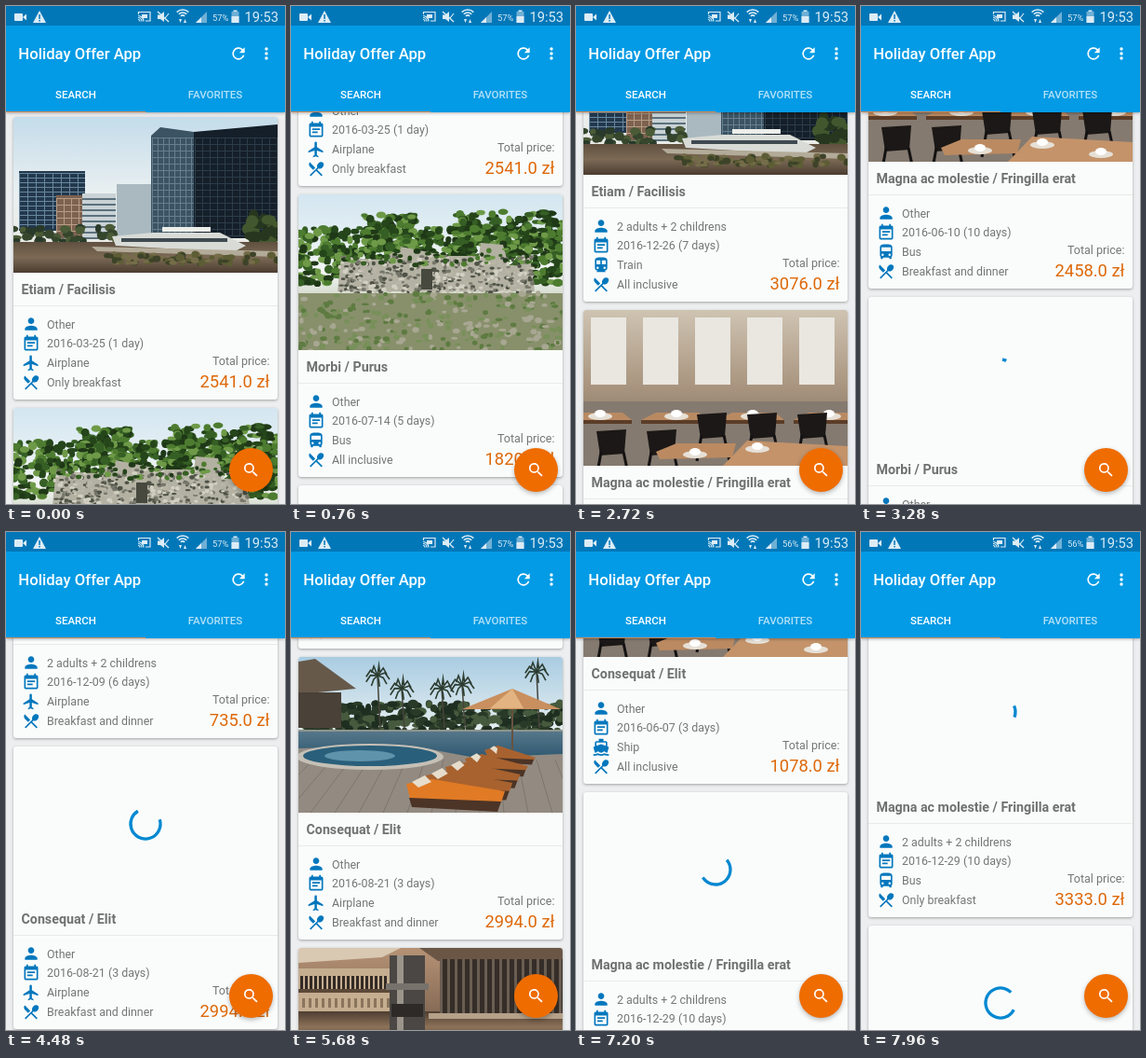
An HTML page with a canvas that plays this animation: 300 by 534 pixels, repeating every 8000 ms.

```html
<!DOCTYPE html>
<html lang="en">
<head>
<meta charset="utf-8">
<title>Holiday Offer App</title>
<style>
html, body { margin: 0; width: 100%; height: 100%; overflow: hidden; background: #eceeef; }
canvas { display: block; width: 300px; height: 534px; }
</style>
</head>
<body>
<canvas id="stage" width="300" height="534"></canvas>
<script>
const LOOP = 8000, PITCH = 312, TOP = 119, CARD_H = 303, IMG_W = 284, IMG_H = 167;
const BLUE = '#0277bd', ORANGE = '#ef6c00';
const stage = document.getElementById('stage').getContext('2d');
let c = stage;

// Icons on a 24 unit grid
const icons = {
  person: 'M12 12c2.21 0 4-1.79 4-4s-1.79-4-4-4-4 1.79-4 4 1.79 4 4 4zm0 2c-2.67 0-8 1.34-8 4v2h16v-2c0-2.66-5.33-4-8-4z',
  date: 'M19 3h-1V1h-2v2H8V1H6v2H5Q3 3 3 5V19Q3 21 5 21H19Q21 21 21 19V5Q21 3 19 3zM19 19H5V8H19zM17 10H7v2h10zM14 14H7v2h7z',
  Airplane: 'M21 16v-2l-8-5V3.5a1.5 1.5 0 0 0-3 0V9l-8 5v2l8-2.5V19l-2 1.5V22l3.5-1 3.5 1v-1.5L13 19v-5.5z',
  food: 'M8.1 13.34l2.83-2.83L3.91 3.5c-1.56 1.56-1.56 4.09 0 5.66zM14.88 11.53c1.53.71 3.68.21 5.27-1.38 1.91-1.91 2.28-4.65.81-6.12-1.46-1.46-4.2-1.1-6.12.81-1.59 1.59-2.09 3.74-1.38 5.27L3.7 19.87l1.41 1.41L12 14.41l6.88 6.88 1.41-1.41L13.41 13z',
  Bus: 'M4 16q0 1.4 1 2.2V20q0 1 1 1h1q1 0 1-1v-1h8v1q0 1 1 1h1q1 0 1-1v-1.8q1-.8 1-2.2V6c0-3.5-3.6-4-8-4s-8 .5-8 4zM6 15.5a1.5 1.5 0 1 1 3 0a1.5 1.5 0 1 1-3 0zM15 15.5a1.5 1.5 0 1 1 3 0a1.5 1.5 0 1 1-3 0zM18 11H6V6h12z',
  Train: 'M12 2c-4.4 0-8 .5-8 4v9.5Q4 19 7.5 19L6 20.5v.5h12v-.5L16.5 19Q20 19 20 15.5V6c0-3.5-3.6-4-8-4zM6 15.5a1.5 1.5 0 1 1 3 0a1.5 1.5 0 1 1-3 0zM15 15.5a1.5 1.5 0 1 1 3 0a1.5 1.5 0 1 1-3 0zM11 11H6V6h5zM18 11h-5V6h5z',
  Ship: 'M2 21q3 0 6-1.3 4 2.6 8 0 3 1.3 6 1.3v2q-3 0-6-1-4 2-8 0-3 1-6 1zM4 19q2.4 0 4-2 4 4 8 0 1.6 2 4 2l2-7.2-2-1.2V6q0-2-2-2h-3V1H9v3H6q-2 0-2 2v4.6l-2 1.2zM6 6h12v4l-6-2-6 2z',
  Other: 'M2 21L23 12 2 3v7l15 2-15 2z',
  search: 'M15.5 14h-.8l-.3-.3A6.5 6.5 0 1 0 13.7 14.4l.3.3v.8l5 5L20.5 19zM9.5 14a4.5 4.5 0 1 1 0-9a4.5 4.5 0 0 1 0 9z',
  refresh: 'M17.65 6.35A8 8 0 1 0 19.73 14h-2.08A6 6 0 1 1 16.22 7.78L13 11h7V4z'
};
for (const k in icons) icons[k] = new Path2D(icons[k]);

const rect = (color, x, y, w, h) => { c.fillStyle = color; c.fillRect(x, y, w, h); };
function poly(color, ...p) {
  c.fillStyle = color;
  c.beginPath();
  for (let i = 0; i < p.length; i += 2) c.lineTo(p[i], p[i + 1]);
  c.fill();
}
function oval(color, x, y, rx, ry = rx) {
  c.fillStyle = color;
  c.beginPath();
  c.ellipse(x, y, rx, ry, 0, 0, 7);
  c.fill();
}
function line(color, width, ...p) {
  c.strokeStyle = color;
  c.lineWidth = width;
  c.beginPath();
  for (let i = 0; i < p.length; i += 2) c.lineTo(p[i], p[i + 1]);
  c.stroke();
}
function fade(y, h, ...colors) {
  const g = c.createLinearGradient(0, y, 0, y + h);
  colors.forEach((col, i) => g.addColorStop(i / (colors.length - 1), col));
  rect(g, 0, y, IMG_W, h);
}
function text(str, x, y, size, color, weight = 400, align = 'left') {
  c.font = `${weight} ${size}px Roboto, sans-serif`;
  c.textAlign = align;
  c.fillStyle = color;
  c.fillText(str, x, y);
}
function icon(name, x, y, color) {
  c.save();
  c.translate(x - 10, y - 10);
  c.scale(20 / 24, 20 / 24);
  c.fillStyle = color;
  c.fill(icons[name], 'evenodd');
  c.restore();
}
function shadow(color, blur, dy, draw) {
  c.save();
  c.shadowColor = color;
  c.shadowBlur = blur;
  c.shadowOffsetY = dy;
  draw();
  c.restore();
}

let seed = 1;
const rnd = (a, b) => a + (b - a) * ((seed = seed * 16807 % 2147483647) / 2147483647);
function specks(n, colors, x0, y0, x1, y1, r) {
  for (let i = 0; i < n; i++)
    oval(colors[i % colors.length], rnd(x0, x1), rnd(y0, y1), rnd(r / 2, r), rnd(r / 3, r * .8));
}
function windows(color, x, y, w, h, dx, dy) {
  for (let i = x; i < x + w; i += dx) rect(color, i, y, 1, h);
  for (let j = y; j < y + h; j += dy) rect(color, x, j, w, 1);
}
function chair(x, y) {
  poly('#1b1817', x, y, x + 32, y - 2, x + 30, y + 24, x + 4, y + 26);
  line('#141212', 3, x + 5, y + 22, x, y + 50);
  line('#141212', 3, x + 29, y + 22, x + 35, y + 50);
}
function cup(x, y) {
  oval('#e6e0d7', x, y + 3, 13, 4);
  oval('#fff', x, y, 6, 4);
}

// Simplified holiday pictures
const scenes = {
  city() {
    fade(0, IMG_H, '#c4dcea', '#eaf0f1', '#e8e6de');
    rect('#aab9c0', 111, 72, 42, 58);
    rect('#23384c', 6, 58, 71, 64);
    windows('#6888a0', 6, 60, 71, 60, 9, 5);
    rect('#7d6250', 46, 84, 32, 46);
    windows('#b79d85', 46, 87, 32, 42, 8, 7);
    rect('#c9d2d5', 74, 82, 36, 49);
    for (let y = 87; y < 130; y += 6) rect('#5b717d', 74, y, 36, 2);
    poly('#3b5363', 148, 20, 158, 11, 194, 16, 194, 128, 148, 128);
    windows('#66808f', 149, 22, 45, 104, 6, 7);
    poly('#151f29', 194, 16, 284, 8, 284, 130, 194, 130);
    windows('#2c3c49', 195, 22, 89, 106, 8, 7);
    specks(50, ['#35462d', '#4b5b37', '#293a2a'], 0, 118, 110, 134, 6);
    specks(30, ['#27371f', '#43572f'], 252, 106, 284, 142, 9);
    fade(134, 33, '#60503f', '#7c6a56', '#4a3c30');
    poly('#d8dbd6', 106, 128, 150, 124, 222, 124, 250, 138, 236, 145, 110, 138);
    rect('#3f4a50', 116, 130, 114, 4);
    rect('#eceeea', 160, 118, 52, 5);
    poly('#b3ab99', 84, 139, 284, 144, 284, 150, 90, 144);
    specks(90, ['#5d5d35', '#756c49', '#3d4328'], 100, 147, 284, 157, 5);
  },
  ruins() {
    fade(0, IMG_H, '#d3e6f1', '#f3f6f5', '#8d9b70');
    const leaves = ['#25451a', '#4d7c30', '#1f3817', '#6e9a48', '#365f25'];
    specks(700, leaves, 0, 36, 284, 96, 6);
    specks(120, leaves, 70, 22, 125, 60, 6);
    specks(160, leaves, 170, 18, 284, 60, 6);
    poly('#b3b1a2', 42, 104, 46, 68, 90, 70, 110, 56, 160, 66, 194, 66, 196, 52, 220, 54, 226, 76, 250, 74, 254, 104);
    specks(480, ['#d2d0c2', '#77776b', '#b9b6a8', '#4e5246'], 44, 66, 252, 106, 3);
    specks(60, leaves, 40, 56, 250, 76, 4);
    rect('#47493f', 132, 80, 12, 22);
    rect('#88906b', 0, 106, 284, 61);
    specks(300, ['#a8a792', '#78905a', '#5e7b42'], 0, 106, 284, 167, 4);
  },
  restaurant() {
    fade(0, IMG_H, '#cfc3b2', '#a8947e', '#6d6057');
    for (let x = 8; x < 284; x += 56) rect('#e9e7e0', x, 8, 38, 72);
    rect('#857a70', 0, 98, 284, 69);
    for (let i = 0; i < 4; i++) {
      const x = i * 82 - 20;
      poly('#b98a62', x, 118, x + 16, 110, x + 62, 110, x + 72, 118);
      rect('#5b3d28', x, 118, 72, 4);
      cup(x + 38, 111);
    }
    for (let x = 14; x < 284; x += 54) chair(x, x > 120 ? 112 : 130);
    poly('#bb8a61', 78, 152, 100, 143, 164, 143, 160, 158, 82, 160);
    poly('#c4936a', 150, 167, 176, 140, 284, 146, 284, 167);
    cup(120, 152);
    cup(187, 146);
    cup(250, 156);
  },
  pool() {
    fade(0, 90, '#a9cce2', '#eef3f2');
    specks(420, ['#2a3a28', '#465a3d', '#1e2e20'], 0, 50, 284, 80, 6);
    for (const [x, y, h] of [[85, 20, 60], [111, 34, 45], [154, 34, 42], [176, 30, 46], [256, 16, 60]]) {
      line('#45443a', 1.5, x, y, x + 3, y + h);
      for (let a = 0; a < 9; a++) {
        const dx = Math.cos(a * .7), dy = 8 * Math.sin(a * .7);
        line('#2d3c30', 1.6, x, y, x + 8 * dx, y - 3 + dy, x + 13 * dx, y + 4 + dy);
      }
    }
    poly('#67594a', 0, 5, 18, 2, 62, 34, 0, 40);
    rect('#4a4138', 0, 38, 46, 38);
    fade(80, 30, '#56778a', '#2c566f');
    rect('#8e958f', 0, 78, 284, 2);
    poly('#938b82', 0, 98, 120, 95, 190, 108, 284, 104, 284, 167, 0, 167);
    for (let i = 0; i < 15; i++) line('#7d766e', 1, i * 20 - 4, 110, i * 26 - 65, 167);
    oval('#c5c0b6', 77, 107, 79, 14);
    oval('#2a5f7b', 77, 106, 72, 11);
    oval('#5e93ab', 66, 106, 38, 6);
    line('#665340', 2, 230, 36, 230, 112);
    poly('#c98f5e', 176, 56, 230, 34, 282, 56);
    poly('#e3b382', 206, 55, 230, 34, 242, 55);
    for (let i = 4; i >= 0; i--) {
      const x = 116 + i * 21, y = 136 - i * 9, k = 1 - i * .12;
      poly(i ? '#a8622f' : '#e07a25', x, y, x + 28 * k, y - 5, x + 106 * k, y + 8, x + 102 * k, y + 20 * k, x + 4, y + 16 * k);
      poly('#4c3426', x + 3, y + 15 * k, x + 102 * k, y + 19 * k, x + 98 * k, y + 30 * k, x + 6, y + 25 * k);
      poly('#e6ddcc', x + 6, y - 2, x + 20 * k, y - 9 * k, x + 27 * k, y - 2, x + 13, y + 4);
    }
  },
  bar() {
    fade(0, IMG_H, '#b59275', '#7d6350', '#34271f');
    poly('#d9c8b2', 0, 0, 110, 0, 90, 10, 0, 16);
    poly('#6b5646', 130, 0, 284, 0, 284, 12, 150, 14);
    rect('#c5ad90', 0, 22, 98, 46);
    for (let x = 2; x < 96; x += 5) rect('#332a24', x, 30, 3, 14);
    rect('#5c4938', 0, 44, 98, 4);
    for (let x = 4; x < 96; x += 7) rect('#8a745c', x, 54, 3, 10);
    fade(68, 34, '#4e3e32', '#8d7259', '#4c392a');
    rect('#4a4744', 98, 8, 38, 100);
    rect('#9b948a', 106, 8, 7, 100);
    rect('#77726c', 94, 38, 46, 7);
    rect('#2d2a28', 100, 60, 34, 14);
    for (let x = 152; x < 284; x += 8) {
      rect('#6a5e52', x, 12, 3, 58);
      rect('#352d28', x + 3, 12, 5, 58);
    }
    rect('#b5a189', 140, 70, 144, 6);
    rect('#2b221c', 0, 102, 284, 65);
    for (let x = 18; x < 284; x += 52) { oval('#92755a', x, 122, 22, 6); rect('#604936', x - 3, 128, 6, 39); }
  }
};
for (const k in scenes) {
  const cv = document.createElement('canvas');
  cv.width = IMG_W;
  cv.height = IMG_H;
  c = cv.getContext('2d');
  scenes[k]();
  scenes[k] = cv;
}
c = stage;

// title, people, date, transport, food, price, scene, spinner start, picture loaded
const cards = [
  ['Etiam / Facilisis', 'Other', '2016-03-25 (1 day)', 'Airplane', 'Only breakfast', '2541.0', 'city', -1, -999],
  ['Morbi / Purus', 'Other', '2016-07-14 (5 days)', 'Bus', 'All inclusive', '1820.0', 'ruins', -1, -999],
  ['Etiam / Facilisis', '2 adults + 2 childrens', '2016-12-26 (7 days)', 'Train', 'All inclusive', '3076.0', 'city', 760, 2500],
  ['Magna ac molestie / Fringilla erat', 'Other', '2016-06-10 (10 days)', 'Bus', 'Breakfast and dinner', '2458.0', 'restaurant', 893, 2350],
  ['Morbi / Purus', 'Other', '2016-09-17 (4 days)', 'Train', 'Only breakfast', '1246.0', 'ruins', 3240, 3800],
  ['Etiam / Facilisis', '2 adults + 2 childrens', '2016-12-09 (6 days)', 'Airplane', 'Breakfast and dinner', '735.0', 'city', 3400, 4300],
  ['Consequat / Elit', 'Other', '2016-08-21 (3 days)', 'Airplane', 'Breakfast and dinner', '2994.0', 'pool', 4067, 4850],
  ['Morbi / Purus', '2 adults + children', '2016-12-28 (6 days)', 'Other', 'Breakfast and dinner', '1635.0', 'bar', 4930, 5400],
  ['Consequat / Elit', 'Other', '2016-06-07 (3 days)', 'Ship', 'All inclusive', '1078.0', 'restaurant', 6370, 6760],
  ['Magna ac molestie / Fringilla erat', '2 adults + 2 childrens', '2016-12-29 (10 days)', 'Bus', 'Only breakfast', '3333.0', 'pool', 6920, 9000],
  ['Etiam / Facilisis', 'Other', '2016-10-02 (2 days)', 'Train', 'All inclusive', '1490.0', 'bar', 7296, 9000]
];

// Each fling: start, duration, distance
const flings = [[690, 600, 729], [3200, 250, 472], [3985, 450, 560], [4900, 400, 96], [6329, 235, 531], [6915, 1070, 429]];
const clamp = v => Math.min(1, Math.max(0, v));
const scrollAt = t => flings.reduce((s, [at, dur, dist]) => s + dist * (1 - (1 - clamp((t - at) / dur)) ** 3), 0);

// Cubic bezier (.4, 0, .2, 1)
function ease(x) {
  let lo = 0, hi = 1, u;
  for (let i = 0; i < 16; i++) {
    u = (lo + hi) / 2;
    if (1.2 * u * (1 - u) ** 2 + .6 * u * u * (1 - u) + u ** 3 < x) lo = u; else hi = u;
  }
  return u * u * (3 - 2 * u);
}

function spinner(x, y, age) {
  const turns = Math.max(0, age) / 1333, n = Math.floor(turns), p = turns - n;
  const base = -90 + 234 * turns + 288 * n;
  const from = base + 288 * ease(clamp(p * 2 - 1)), to = base + 288 * ease(clamp(p * 2));
  c.strokeStyle = '#0288d1';
  c.lineWidth = 3.3;
  c.beginPath();
  c.arc(x, y, 16, from * Math.PI / 180, Math.max(to, from + 16) * Math.PI / 180);
  c.stroke();
}

function drawCard([title, people, date, transport, food, price, scene, born, loaded], y, t) {
  c.beginPath();
  c.roundRect(8, y, IMG_W, CARD_H, 3);
  c.fillStyle = '#fafcfc';
  shadow('rgba(0,0,0,.32)', 3, 1, () => c.fill());
  if (t < loaded) spinner(150, y + 83, t - born);
  else {
    c.save();
    c.clip();
    c.globalAlpha = clamp((t - loaded) / 200);
    c.drawImage(scenes[scene], 8, y);
    c.restore();
  }
  text(title, 16.5, y + 190, 14.25, '#707070', 700);
  rect('#e9ebeb', 8, y + 202, IMG_W, 1);
  [['person', people], ['date', date], [transport, transport], ['food', food]].forEach(([name, label], i) => {
    const cy = y + 222 + i * 20.9;
    icon(name, 27, cy, BLUE);
    text(label, 44, cy + 4.5, 12.45, '#757575');
  });
  text('Total price:', 283.5, y + 266, 12.5, '#757575', 400, 'right');
  text(price + ' zł', 283.5, y + 290, 18.33, '#de6809', 400, 'right');
}

function statusBar(t) {
  const w = '#dcecf5', dim = '#6fb0d5';
  rect('#0277b8', 0, 0, 300, 21);
  c.fillStyle = w;
  c.beginPath();
  c.roundRect(9, 8, 9, 8, 1);
  c.fill();
  poly(w, 18, 12, 22, 8.5, 22, 15.5);
  poly(w, 36, 5, 43, 18, 29, 18);
  rect(BLUE, 35.3, 9, 1.5, 5);
  rect(BLUE, 35.3, 15, 1.5, 1.5);
  line(w, 1.2, 142.5, 9, 142.5, 6.5, 155, 6.5, 155, 16, 150, 16);
  rect(w, 146, 9, 6, 4);
  c.lineWidth = 1.2;
  for (const r of [2, 4, 6]) { c.beginPath(); c.arc(142, 16.5, r, -Math.PI / 2, 0); c.stroke(); }
  poly(w, 163, 9.5, 166, 9.5, 170, 6, 170, 17, 166, 14, 163, 14);
  line(w, 1.4, 163, 6, 175, 17);
  line(w, 1.2, 171, 13, 175, 8);
  c.lineWidth = 1.6;
  for (const r of [3, 6, 9]) { c.beginPath(); c.arc(190, 13, r, -2.35, -.79); c.stroke(); }
  poly(w, 186, 14, 189, 14, 187.5, 18);
  poly(w, 191, 18, 194, 18, 192.5, 14);
  poly(dim, 204, 18, 216, 18, 216, 6);
  poly(w, 204, 18, 210, 18, 210, 12);
  text(t < 7000 ? '57%' : '56%', 222, 15.5, 9.3, w);
  rect(dim, 242.5, 6, 8, 12);
  rect(w, 242.5, 11, 8, 7);
  rect(w, 244.5, 4.5, 4, 1.5);
  text('19:53', 256.5, 17, 14.7, w);
}

function draw() {
  const t = performance.now() % LOOP, scroll = scrollAt(t);
  rect('#eceeef', 0, 0, 300, 534);
  cards.forEach((card, i) => {
    const y = Math.round(TOP + i * PITCH - scroll);
    if (y > -CARD_H && y < 540) drawCard(card, y, t);
  });

  shadow('rgba(0,0,0,.3)', 3, 1, () => rect('#039be5', 0, 0, 300, 114));
  statusBar(t);
  text('Holiday Offer App', 13.33, 57, 16.67, '#fff', 500);
  icon('refresh', 250, 51, '#fff');
  for (const y of [46, 51, 56]) oval('#fff', 280, y, 1.7);
  text('SEARCH', 75, 99, 11.5, '#fff', 500, 'center');
  text('FAVORITES', 225, 99, 11.5, 'rgba(255,255,255,.7)', 500, 'center');
  rect('#d08a55', 0, 113, 150, 1);

  shadow('rgba(0,0,0,.28)', 5, 2, () => oval(ORANGE, 263.5, 497.5, 23.5));
  icon('search', 263.5, 497.5, '#fff');
  requestAnimationFrame(draw);
}
draw();
</script>
</body>
</html>
```
